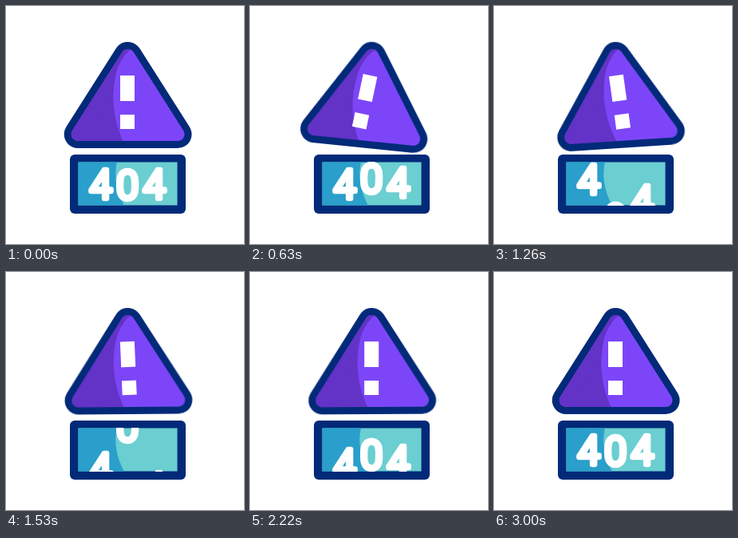
These frames come from a looping animation (298 px wide and 298 px high, 3.33 s). An HTML page without scripts:

```html
<!DOCTYPE html>
<html lang="en">
<head>
<meta charset="utf-8">
<title>404 warning</title>
<style>
  html, body { margin: 0; width: 100%; height: 100%; overflow: hidden; background: #fff; }
  svg { display: block; width: 100vw; height: 100vh; }
  .navy { fill: #022a78; }
  .round { stroke-linejoin: round; }

  text {
    font: 300 50px Roboto, "Liberation Sans", sans-serif;
    text-anchor: middle;
    fill: #fff; stroke: #fff; stroke-width: 6.5px; stroke-linejoin: round;
  }

  .sign, .mark { animation: swing 3.33s cubic-bezier(.37, 0, .63, 1) infinite; }
  .sign { transform-origin: 152.6px 62.4px; }
  .mark { transform-origin: 152px 97px; animation-name: follow; }
  .reel { animation: left 3.33s linear infinite; }
  .reel.mid { animation-name: mid; }
  .reel.right { animation-name: right; }

  /* damped swing, one peak every 600 ms */
  @keyframes swing {
    0% { transform: rotate(0deg); }
    18.02% { transform: rotate(5.9deg); }
    36.04% { transform: rotate(-3.9deg); }
    54.05% { transform: rotate(2deg); }
    72.07% { transform: rotate(-.9deg); }
    90.09%, 100% { transform: rotate(0deg); }
  }
  /* the mark trails a little behind the sign */
  @keyframes follow {
    0%, 1.8% { transform: rotate(0deg); }
    20.72% { transform: rotate(6.3deg); }
    38.74% { transform: rotate(-4.2deg); }
    56.76% { transform: rotate(2.2deg); }
    74.77% { transform: rotate(-.9deg); }
    90.09%, 100% { transform: rotate(0deg); }
  }
  /* reels: one digit every 100 units */
  @keyframes left {
    0% { transform: translateY(0); animation-timing-function: cubic-bezier(.5, 0, .8, .65); }
    18.92% { transform: translateY(-100px); }
    31.53% { transform: translateY(-217px); }
    37.84% { transform: translateY(-306px); }
    54.05% { transform: translateY(-450px); }
    66.67% { transform: translateY(-583px); animation-timing-function: ease-out; }
    75%, 100% { transform: translateY(-600px); }
  }
  @keyframes mid {
    0% { transform: translateY(0); animation-timing-function: cubic-bezier(.5, 0, .8, .65); }
    18.92% { transform: translateY(-107px); }
    31.53% { transform: translateY(-199px); }
    37.84% { transform: translateY(-257px); }
    54.05% { transform: translateY(-401px); }
    66.67% { transform: translateY(-495px); animation-timing-function: ease-out; }
    75%, 100% { transform: translateY(-500px); }
  }
  @keyframes right {
    0% { transform: translateY(0); animation-timing-function: cubic-bezier(.5, 0, .8, .65); }
    18.92% { transform: translateY(-102px); }
    31.53% { transform: translateY(-217px); }
    37.84% { transform: translateY(-280px); }
    54.05% { transform: translateY(-429px); }
    66.67% { transform: translateY(-587px); animation-timing-function: ease-out; }
    75%, 100% { transform: translateY(-600px); }
  }
</style>
</head>
<body>
<svg viewBox="0 0 298 298">
  <defs>
    <path id="tri" d="M152.6 62.4 215 160.6H90.2Z"/>
    <clipPath id="shade"><path d="M40 30H160V53Q152 55 144 69C131 91 130 137 148 172V185H40Z"/></clipPath>
    <clipPath id="window"><rect x="90.5" y="195.5" width="124" height="54"/></clipPath>
  </defs>

  <g class="sign">
    <use href="#tri" class="navy round" stroke="#022a78" stroke-width="35"/>
    <use href="#tri" class="round" fill="#7c46f8" stroke="#7c46f8" stroke-width="17"/>
    <g clip-path="url(#shade)">
      <use href="#tri" class="round" fill="#6332c6" stroke="#6332c6" stroke-width="17"/>
    </g>
    <g class="mark" fill="#fff">
      <rect x="143" y="87" width="18" height="32"/>
      <rect x="143" y="136" width="18" height="18"/>
    </g>
  </g>

  <rect class="navy" x="80" y="186" width="145" height="74" rx="6"/>
  <g clip-path="url(#window)">
    <rect x="90" y="195" width="125" height="55" fill="#6bced1"/>
    <path d="M90 195H139Q133 222 148 250H90Z" fill="#2a9fcb"/>
    <g class="reel">
      <text id="a" x="118.5" y="241.3">4</text>
      <use href="#a" y="100"/><use href="#a" y="200"/><use href="#a" y="300"/>
      <use href="#a" y="400"/><use href="#a" y="500"/><use href="#a" y="600"/>
    </g>
    <g class="reel mid">
      <text id="b" x="152" y="241.6">0</text>
      <use href="#b" y="100"/><use href="#b" y="200"/><use href="#b" y="300"/>
      <use href="#b" y="400"/><use href="#b" y="500"/>
    </g>
    <g class="reel right">
      <text id="c" x="185.5" y="241.3">4</text>
      <use href="#c" y="100"/><use href="#c" y="200"/><use href="#c" y="300"/>
      <use href="#c" y="400"/><use href="#c" y="500"/><use href="#c" y="600"/>
    </g>
  </g>
</svg>
</body>
</html>
```
